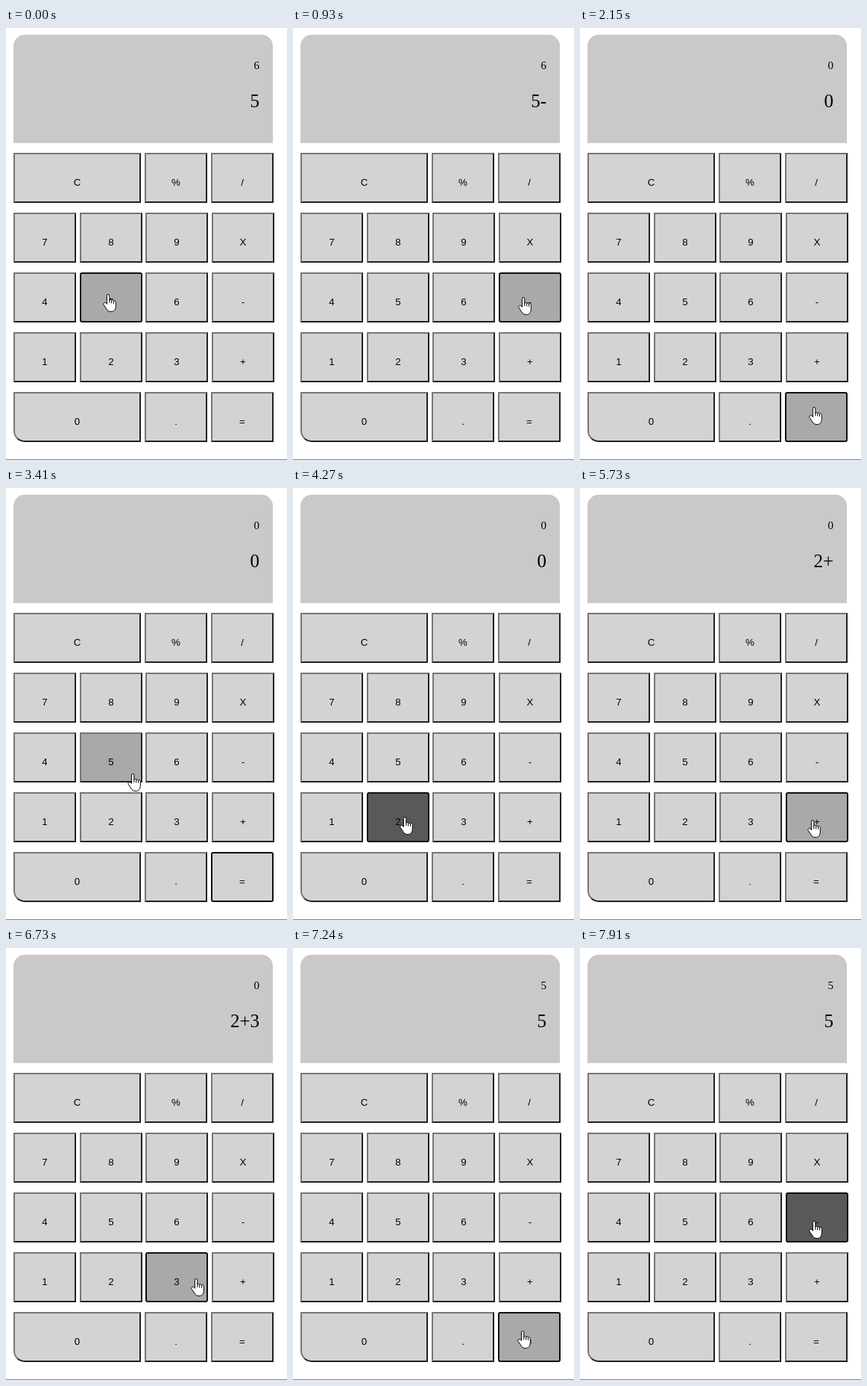
Recreate the animation shown at these times as an HTML page. Size 377 px wide and 578 px high, loop 8000 ms.

```html
<!DOCTYPE html>
<html lang="en">
<head>
<meta charset="utf-8">
<title>Calculator</title>
<style>
  html, body { margin: 0; width: 100%; height: 100%; overflow: hidden; background: #fff; }
  #stage { position: relative; width: 377px; height: 578px; overflow: hidden; cursor: default; }
  #screen, #pointer, .key, #edge { position: absolute; }
  #screen {
    left: 10px; top: 9px; width: 348px; height: 145px;
    background: #c9c9c9; border-radius: 15px 15px 0 0;
  }
  #screen text { font-family: "Liberation Serif", "Times New Roman", serif; text-anchor: end; }
  .key {
    box-sizing: border-box; height: 67px;
    border: 2px solid; border-color: #767676 #212121 #212121 #767676;
    background: #d3d3d3; color: #000; text-align: center;
    font: 13.333px/75px "Liberation Sans", Arial, sans-serif;
  }
  .corner { border-bottom-left-radius: 15px; }
  .hover { background: #a9a9a9; }
  .active { background: #595959; }
  .focus { border-color: #101010; border-radius: 3px; }
  #edge { left: 0; top: 577px; width: 377px; height: 1px; background: #858585; }
  #pointer { left: 0; top: 0; overflow: visible; }
  #pointer path { fill: #fff; stroke: #000; stroke-linejoin: round; }
  #pointer .lines { fill: none; }
</style>
</head>
<body>
<div id="stage">
  <svg id="screen" width="348" height="145">
    <text id="result" x="330" y="46" font-size="15"></text>
    <text id="entry" x="330" y="97" font-size="25"></text>
  </svg>
  <div id="edge"></div>
  <svg id="pointer" width="18" height="24">
    <g id="hand" transform="translate(-.7)">
      <path d="M-.9 13.4V2.2a1.7 1.7 0 0 1 3.4 0V8.4c.2-1.5 2.9-1.4 2.9.5c.2-1.4 2.8-1.2 2.8.7c.2-1.3 2.8-1 2.8.9V16c0 4.8-2.6 7.5-6.2 7.5C1.3 23.5-.2 22-1.4 20L-5 14.6C-6.5 12.2-3.5 10.2-1.9 12.2z"/>
      <path class="lines" d="M2.5 8V12M5.4 9V12.5M8.2 9.7V12.7"/>
    </g>
    <path id="arrow" d="M.5.5V16.5L4.2 13L6.6 18.5L9.2 17.4L6.9 12.2H11.5z"/>
  </svg>
</div>
<script>
const LOOP = 8000, TICK = 130, HOLD = 120;
const LEFT = 10, TOP = 167, PITCH = 88.6, ROW = 80, KEY_W = 83.5, KEY_H = 67;
const rows = ["C%/", "789X", "456-", "123+", "0.="];
const $ = id => document.getElementById(id);

// In a row of three, the first key spans two columns
const keys = rows.flatMap((row, r) => [...row].map((label, c) => {
  const short = row.length === 3;
  const col = short && c ? c + 1 : c;
  const x = Math.round(LEFT + PITCH * col - (short && c ? 1 : 0));
  const w = short && !c ? 171 : Math.round(KEY_W);
  const y = TOP + ROW * r;
  const el = document.createElement("div");
  el.textContent = label;
  el.style.cssText = `left:${x}px;top:${y}px;width:${w}px`;
  $("stage").insertBefore(el, $("pointer"));
  return { label, x, y, w, el };
}));

// Key points of the pointer: arrive, leave, x, y and the key clicked on arrival
const stops = [
  [0, 120, 137, 356],
  [780, 930, 309, 360, "-"],
  [1350, 1490, 143, 361, "5"],
  [1640, 1640, 176, 380],
  [2030, 2400, 314, 507, "="],
  [2760, 2760, 278, 474],
  [3410, 3410, 170, 382],
  [4270, 4520, 150, 440, "2"],
  [4760, 4890, 185, 413],
  [5010, 5010, 191, 409],
  [5610, 5730, 312, 444, "+"],
  [6360, 6600, 244, 434, "3"],
  [6730, 6730, 255, 442],
  [7120, 7400, 308, 512, "="],
  [7910, LOOP, 314, 365, "-"]
];

// Straight moves between stops, advanced once per tick
function pointerAt(t) {
  const i = stops.findLastIndex(s => s[0] <= t);
  const [, leave, x, y] = stops[i];
  if (t < leave || i === stops.length - 1) return [x, y];
  const [arrive, , nx, ny] = stops[i + 1];
  const u = Math.floor((t - leave) / TICK) * TICK / (arrive - leave);
  return [Math.round(x + (nx - x) * u), Math.round(y + (ny - y) * u)];
}

function compute(sum) {
  const [, a, op, b] = sum.match(/(\d+)([+-])(\d+)/);
  return String(op === "+" ? +a + +b : a - b);
}

// Replays the clicks up to time t
function calculator(t) {
  const state = { entry: "5", result: "6", focus: "5", down: false };
  for (const [time, , , , key] of stops) {
    if (!key || time > t) continue;
    state.focus = key;
    state.down = t < time + HOLD;
    if (state.down) continue;
    if (key === "=") state.entry = state.result = compute(state.entry);
    else state.entry = state.entry === "0" ? key : state.entry + key;
  }
  return state;
}

function draw(t) {
  const [x, y] = pointerAt(t);
  const { entry, result, focus, down } = calculator(t);
  const over = keys.find(k => x >= k.x && x < k.x + k.w && y >= k.y && y < k.y + KEY_H);

  for (const k of keys) {
    const focused = k.label === focus;
    let name = "key";
    if (k.label === "0") name += " corner";
    if (k === over) name += focused && down ? " active" : " hover";
    if (focused) name += " focus";
    if (k.el.className !== name) k.el.className = name;
  }
  $("entry").textContent = entry;
  $("result").textContent = result;
  $("hand").style.display = over ? "" : "none";
  $("arrow").style.display = over ? "none" : "";
  $("pointer").style.transform = `translate(${x}px,${y}px)`;
}

const begin = performance.now();
function frame() {
  draw((performance.now() - begin) % LOOP);
  requestAnimationFrame(frame);
}
frame();
</script>
</body>
</html>
```
